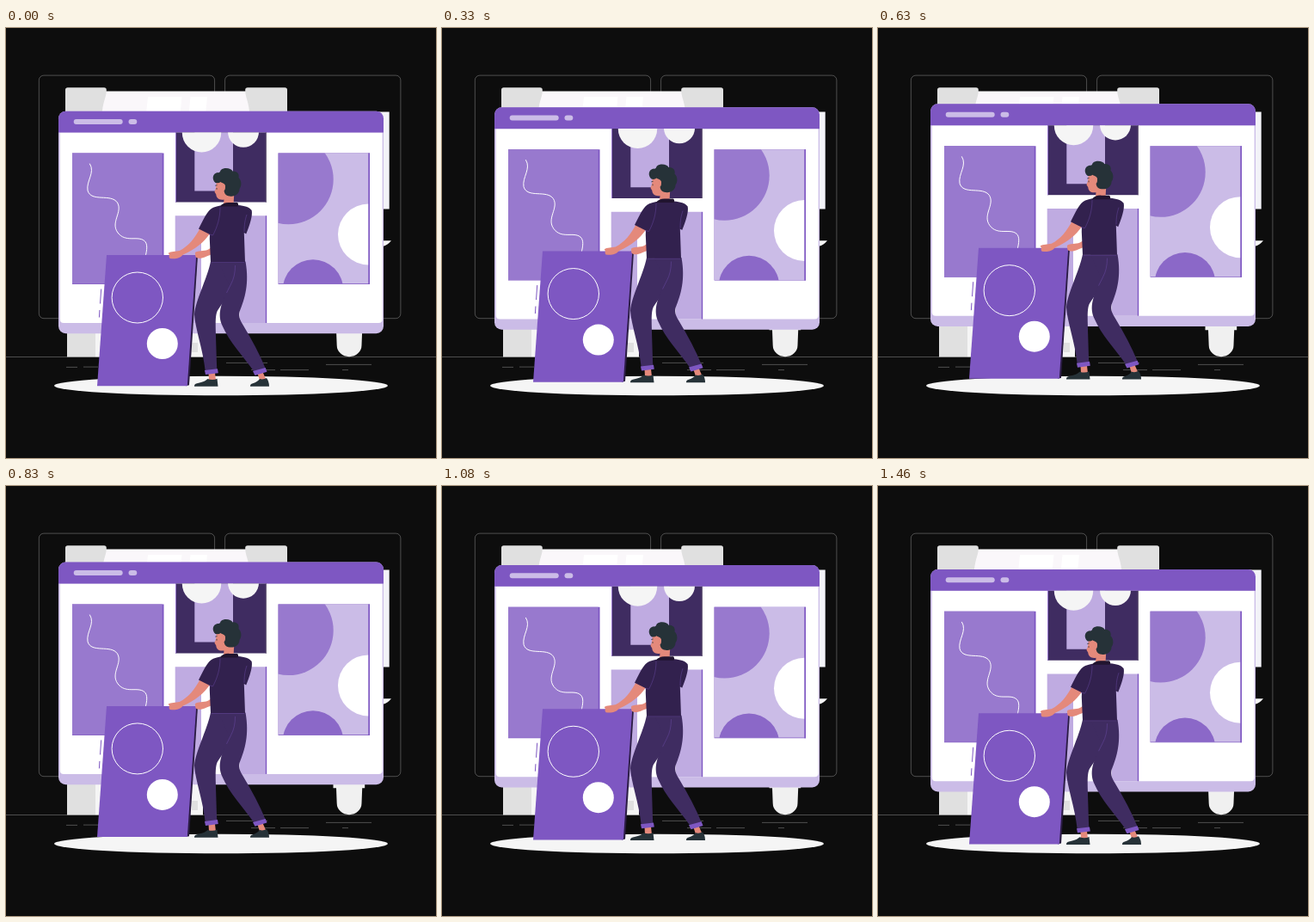
Write an HTML page that moves like this. It is 500 px wide and 500 px high and loops after 1.5 s.

```html
<!DOCTYPE html>
<html lang="en">
<head>
<meta charset="utf-8">
<title>Hanging the gallery</title>
<style>
  html, body { margin: 0; width: 100%; height: 100%; overflow: hidden; background: #0d0d0d; }
  svg { display: block; width: 100vw; height: 100vh; }
  .purple { fill: #7e57c2; }
  .mid { fill: #9879ce; }
  .soft { fill: #bfabe1; }
  .pale { fill: #cbbce7; }
  .dark { fill: #3f2c61; }
  .shirt { fill: #32214e; }
  .skin { fill: #e4897b; }
  .ink { fill: #263238; }
  .white { fill: #fff; }
  .snow { fill: #f5f5f5; }
  .grey { fill: #e0e0e0; }
  .hair { fill: none; stroke: #ebebeb; stroke-width: .3; }
  .line { fill: none; stroke: #fff; stroke-width: 1; stroke-linecap: round; }
  .seam { fill: none; stroke: #7e57c2; stroke-width: .35; }
</style>
</head>
<body>
<svg viewBox="0 0 500 500">
  <defs>
    <clipPath id="topArt"><rect x="197" y="121.5" width="106" height="81"/></clipPath>
    <clipPath id="rightArt"><rect x="316.6" y="145.6" width="105.4" height="152"/></clipPath>
  </defs>

  <!-- Backdrop -->
  <g class="hair">
    <rect x="38.34" y="55.1" width="204.25" height="282.6" rx="5.6"/>
    <rect x="254.6" y="55.1" width="204.3" height="282.6" rx="5.6"/>
    <path d="M0 382.5H500M70 394.4h13M90 394.1h17M256 389.4h48M285 397.6h28M319 397.6h33M372 391.4h53M391 397.6h7"/>
  </g>
  <path fill="#faf7fa" d="M110 73.5H284V120H110Z"/>
  <path class="white" d="M165 80h39.5l-3 30h-39.500ZM214.500 80h19.500l-3 30h-19.500Z"/>
  <path class="grey" d="M69 110V72q0-2.800 2.800-2.800H114q2.800 0 2.800 2.800C117 82 111 86 111.500 110ZM327 110V72q0-2.800-2.800-2.800H281q-2.800 0-2.800 2.800C278 82 284 86 283.500 110Z"/>
  <path class="snow" d="M104 330H229V382.400H104Z"/>
  <path class="grey" d="M71 330h33v52.400H71ZM216 366h7v11h-7Z"/>
  <path fill="#f0f0f0" d="M380.500 340h36.700v11.300h-3L413.500 369a14.400 13.200 0 0 1-28.800 0L384 351.300h-3.500Z"/>
  <path fill="#f3f3f8" d="M430 97.500h15.700v113H430Z"/>
  <path class="snow" d="M430 247.300h18q-4 5-10 6.700h-8Z"/>
  <ellipse class="snow" cx="250" cy="416" rx="194" ry="11.300"/>

  <g id="floating">
    <!-- Window -->
    <rect class="pale" x="61" y="96.700" width="378" height="258.600" rx="8.500"/>
    <path class="white" d="M62.700 121.500H437.700V338.500q0 4.500-4.500 4.500H67.200q-4.500 0-4.500-4.500Z"/>
    <path class="purple" d="M61 121.600V105.200a8.500 8.500 0 0 1 8.500-8.500H430.500a8.500 8.500 0 0 1 8.500 8.500V121.600Z"/>
    <rect class="pale" x="78.700" y="106" width="57" height="6" rx="3"/>
    <rect class="pale" x="142.500" y="106" width="9.800" height="6" rx="3"/>

    <!-- Left picture -->
    <path class="purple" d="M77 145.600H183.500V298H77Z"/>
    <path class="mid" d="M77 145.600H181.700V297.500H77Z"/>
    <path class="line" d="M97.500 158C104 168 93 178 95 189C99 203 122 192 129.500 203C136 214 121 226 130 238C139 250 153 241 161 247.500C165 251 164 258 162 266"/>

    <!-- Upper middle picture -->
    <g clip-path="url(#topArt)">
      <path class="dark" d="M197 121H303V203H197Z"/>
      <path class="soft" d="M219.300 121H264V189.600H219.300Z"/>
      <circle class="snow" cx="227.500" cy="121.800" r="22.700"/>
      <circle class="snow" cx="276" cy="120.800" r="18"/>
      <path class="mid" d="M197 121h1v82h-1Z"/>
      <path fill="#6b5f7c" d="M301.800 121h1.200v82h-1.200Z"/>
    </g>

    <!-- Lower middle picture -->
    <path class="soft" d="M196.700 218.300H303V343H196.700Z"/>
    <path class="white" d="M227 241H271.500V343H227Z"/>
    <path class="purple" d="M301.800 218.300h1.400V343h-1.400Z"/>

    <!-- Right picture -->
    <path class="purple" d="M316.600 145.600H423V298H316.600Z"/>
    <g clip-path="url(#rightArt)">
      <path class="pale" d="M316 145H422V297.500H316Z"/>
      <circle class="mid" cx="328.500" cy="176" r="52.200"/>
      <circle class="white" cx="421.500" cy="240" r="35.500"/>
      <circle fill="#8b68c8" cx="357" cy="304.500" r="35.200"/>
    </g>
    <path class="purple" d="M421.300 145.600H423V298h-1.700Z"/>

    <!-- Carried board -->
    <path fill="none" stroke="#7e57c2" d="M110.700 303.500l-1.200 17M108.900 328l-.5 8.500"/>
    <path fill="#2b1c44" d="M219 264.300l4 .7L213 415.300l-4 .9Z"/>
    <path class="purple" d="M117 264H221.300L210.800 416.200H106Z"/>
    <ellipse class="line" cx="152.800" cy="313.500" rx="29.700" ry="29.500"/>
    <circle class="white" cx="181.800" cy="367" r="18"/>

    <!-- Feet -->
    <path class="skin" d="M235.500 401h7.500l1 9h-8ZM292.500 402l6-2 4 9-7 2Z"/>
    <path class="ink" d="M219 416.800q-.3-2.800 3-3.500C228 412 231 411 234.500 408q6 2 11-.3l1 9.100ZM284 416.800q-.3-2.800 3-3.500C291 412 293 410.500 295 408q4 1.300 8-1 3 4 3 9.800Z"/>

    <!-- Trousers -->
    <path class="dark" d="M238 271.500L270 272C270 291 258 312 247 327C242 334 244 344 245.300 398L231.800 399.500C229 373 220 350 219 333C220 318 234 291 238 271.500Z"/>
    <path class="dark" d="M247 271.500H278.500C283 297 278 314 271.500 330C270 336 273 341 276 346C286 363 295 379 301.800 396L289 400.500C275 380 260 366 251 345C245 330 252 317 260 300Z"/>
    <path class="seam" d="M266.500 276q0 13-5 22l-5 10M239 272.500H277"/>
    <path class="purple" d="M231 398l15-1.800 .8 5-14.800 1.800ZM287 399l14.700-4 1.800 4.700-14 4.200Z"/>

    <!-- Arms and torso -->
    <path class="skin" d="M239 255c-6 5-10 3.500-17 5q-3 1-1.800 3.300q-.8 4.200 3.800 4.500c6 0 8-2 15-4.500Z"/>
    <path class="skin" d="M226 232L237 239C230 249 221 257 206 263.500C201 269 196 268.500 190.500 268q-1.800-2.300-.5-4l-1.300-2.300q2-1.700 6-1.700l7-1C212 254 220 244 226 232Z"/>
    <path class="shirt" d="M249 206.500L270 206C277 206.800 283 208 285.700 212C287 219 283 230 279.200 239.500L276.800 238L278 272.200H238L236.800 245L237 240L224 233.500C230 222 234 212 241 208.800Q245 207.500 249 206.500Z"/>
    <path class="seam" d="M249 208.500C249 220 246 231 240.500 241L237 240M277 237c0-9 1-14 3-20"/>

    <!-- Head -->
    <path class="skin" d="M245 177L266 181L264.500 205.500Q257 208 253 204L253.500 199.500C248 200.500 244.500 197.500 244.300 193.500L242.500 190.500L244 186Z"/>
    <path class="shirt" style="fill:#21142f" d="M249 207.500Q252 202.500 260 203H269q2 2 .5 4.500Z"/>
    <path class="ink" d="M243.500 180C239 176 240 169 246 168C249 169 249 166 250 165C254 161.500 262 163 263.500 166.500C269 166 271.500 170 270.500 174C274.500 178 274 184 271.500 187C271.500 193 266 196.500 260 195.500C255 195 254 192 253.500 189L255 184C255 180 250 180 249.500 179Q247 181 243.500 180Z"/>
    <ellipse class="skin" cx="252.500" cy="185.500" rx="2.400" ry="3.800"/>
    <path fill="none" stroke="#263238" stroke-width=".8" d="M243.300 183.300l2.300-.6M245 186v1.700"/>
  </g>
</svg>
<script>
  const floating = document.getElementById('floating');
  const LOOP = 1500, STEP = 1000 / 24, LEAD = 30, RISE = 10;
  const start = performance.now();

  // Linear rise and fall, stepped at 24 frames per second
  function draw(now) {
    const t = Math.max(0, now - start) % LOOP;
    const stepped = Math.floor((t + 4.5) / STEP) * STEP;
    const phase = ((stepped + LEAD) % LOOP) / LOOP;
    const height = RISE * (1 - Math.abs(1 - 2 * phase));
    floating.setAttribute('transform', `translate(0 ${(0.4 - height).toFixed(3)})`);
    requestAnimationFrame(draw);
  }
  draw(start);
</script>
</body>
</html>
```
